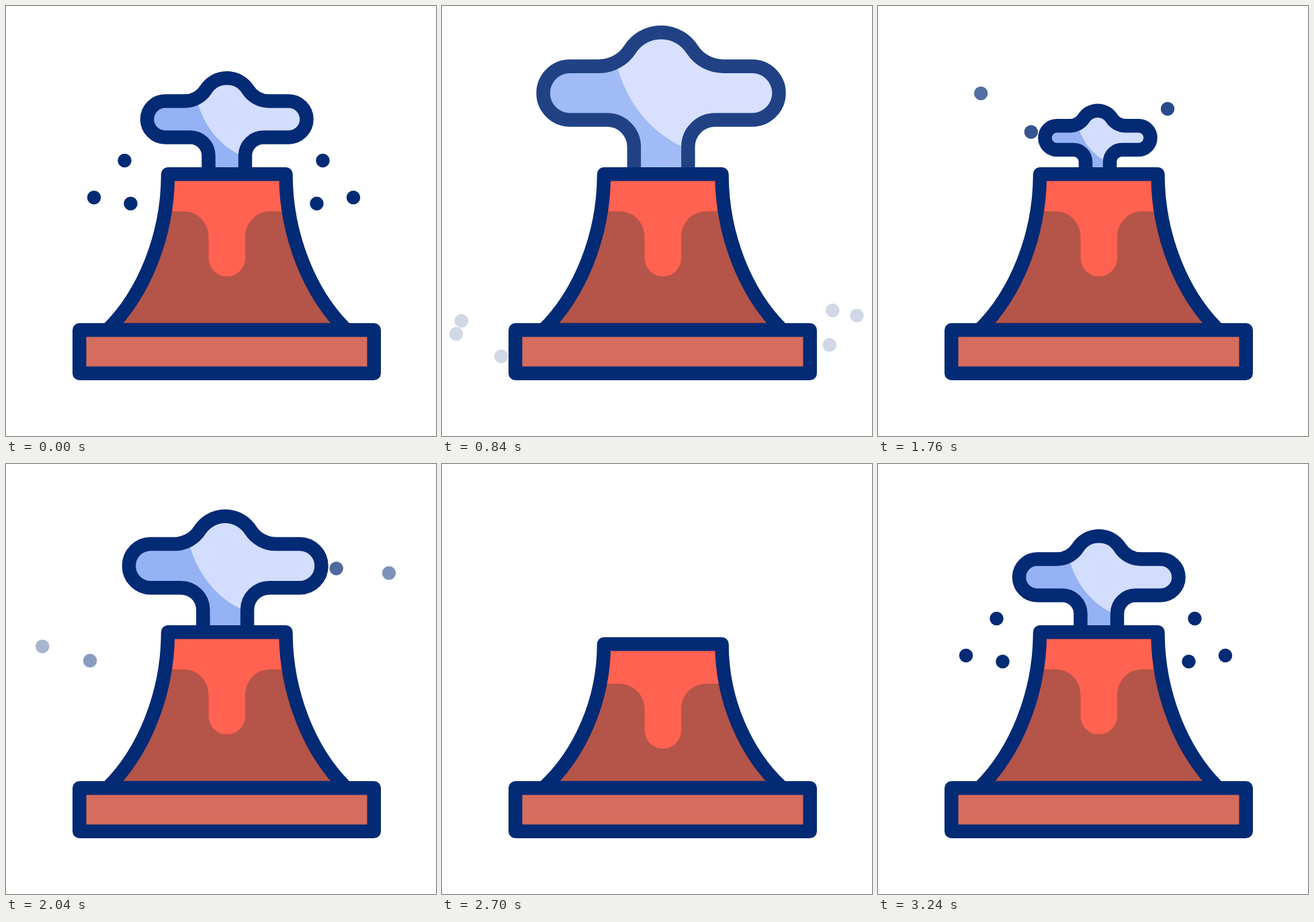
These frames come from a looping animation (640 px wide and 640 px high, 3.62 s). An HTML page:

```html
<!DOCTYPE html>
<html lang="en">
<head>
<meta charset="utf-8">
<title>Volcano</title>
<style>
  html, body { margin: 0; width: 100%; height: 100%; overflow: hidden; background: #fff; }
  svg { display: block; width: 100%; height: 100%; }
  .line { fill: none; stroke: #032a75; stroke-width: 20.5; stroke-linejoin: round; }
</style>
</head>
<body>
<svg viewBox="0 0 640 640">
  <defs>
    <path id="puff" d="M301.5 250V222.7a27.2 27.2 0 0 0-27.2-27.2H237a27 27 0 0 1 0-54H266
      A37.2 37.2 0 0 0 297.4 124.5A37.2 37.2 0 0 1 360.1 124.5A37.2 37.2 0 0 0 391.5 141.5
      H420.5a27 27 0 0 1 0 54H383.2a27.2 27.2 0 0 0-27.2 27.2V250"/>
    <clipPath id="puffClip"><use href="#puff"/></clipPath>
    <clipPath id="coneClip"><path class="cone"/></clipPath>
  </defs>
  <g id="dots" fill="#032a75"></g>
  <g id="cloud">
    <use href="#puff" fill="#d3ddfe"/>
    <path clip-path="url(#puffClip)" fill="#94b2f4" d="M281 125C288 170 313 204 347 221L362 228V260H190V125Z"/>
    <use id="cloudLine" class="line" href="#puff"/>
  </g>
  <g clip-path="url(#coneClip)">
    <rect x="130" y="230" width="400" height="260" fill="#ff6250"/>
    <path id="rock" fill="#b55448" d="M130 305.5H264a37.5 37.5 0 0 1 37.5 37.5V375.2a27.25 27.25 0 0 0 54.5 0
      V343a37.5 37.5 0 0 1 37.5-37.5H530V500H130Z"/>
  </g>
  <path class="cone line"/>
  <rect x="109.25" y="482.25" width="438.5" height="64.5" fill="#d66c5d"/>
  <rect class="line" x="109.25" y="482.25" width="438.5" height="64.5"/>
</svg>
<script>
const LOOP = 3620, STEP = 20, CRATER = { x: 328, y: 250 };
const $ = id => document.getElementById(id);
const clamp = v => Math.max(0, Math.min(1, v));
const progress = (t, from, to) => clamp((t - from) / (to - from));
const mix = (a, b, u) => a + (b - a) * u;

// Resting place and landing place of each ash dot
const ash = [
  [176.5, 230, 27.5, 496], [131, 285, 20, 512], [185.5, 294, 87, 548],
  [471.5, 230, 582.5, 479], [517, 285, 618.5, 482], [462.5, 294, 578, 529]
];
// Second burst: start time, landing x, easing power, cubic height coefficients
const burst = [
  [1493, 27, 2.25, -946, 2062, -870],
  [1593, 87, 2.4, -638, 1800, -862],
  [1635, 618, 2.7, -905, 1825, -688],
  [1793, 615, 2.4, -905, 2332, -1198]
];
const BURST_LIFE = 833;

const dots = ash.map(() => {
  const dot = document.createElementNS("http://www.w3.org/2000/svg", "circle");
  dot.setAttribute("r", 10.25);
  return $("dots").appendChild(dot);
});

function place(dot, x, y, opacity) {
  dot.setAttribute("cx", x);
  dot.setAttribute("cy", y);
  dot.setAttribute("opacity", opacity);
}

function drawDots(t) {
  dots.forEach((dot, i) => {
    const [restX, restY, endX, endY] = ash[i];
    if (t < 985) {
      const u = progress(t, 220, 870);
      place(dot, mix(endX, restX, (1 - u) ** 1.5),
        mix(restY, endY, u * u) - 80 * u * (1 - u), 1 - progress(t, 220, 985));
    } else if (t < 2700) {
      if (!burst[i]) return place(dot, 0, 0, 0);
      const [start, x, power, a, b, c] = burst[i];
      const u = progress(t, start, start + BURST_LIFE);
      place(dot, mix(x, CRATER.x, (1 - u) ** power),
        CRATER.y + u * (a + u * (b + u * c)), t < start ? 0 : 1 - u);
    } else {
      const u = progress(t, 2890, 3240);
      place(dot, mix(restX, CRATER.x, (1 - u) ** 1.4),
        mix(CRATER.y, restY, u) - 200 * u * (1 - u), u > 0 ? 1 : 0);
    }
  });
}

function cloudState(t) {
  if (t < 1200) {
    const s = 1 + 0.00077 * Math.max(0, t - 220);
    return { s, x: 328.75 - 5.6 * (s - 1), opacity: 1 - progress(t, 820, 990) };
  }
  if (t < 2600) {
    const s = progress(t, 1506, 1890) + 0.589 * progress(t, 1890, 2317);
    return { s, x: 328 - 1.5 * s, opacity: 1 - progress(t, 2134, 2317) };
  }
  const s = progress(t, 2860, 3240);
  return { s, x: 328 + 0.75 * s, opacity: 1 };
}

function drawCloud(t) {
  const { s, x, opacity } = cloudState(t);
  const visible = s > 0.02 && opacity > 0;
  $("cloud").style.display = visible ? "" : "none";
  if (!visible) return;
  $("cloud").setAttribute("opacity", opacity);
  $("cloud").setAttribute("transform", `translate(${x} 250) scale(${s}) translate(-328.75 -250)`);
  $("cloudLine").style.strokeWidth = 20.5 / s;
}

function drawCone(t) {
  const dip = (from, low, to) => progress(t, from, low) - progress(t, low, to);
  const sink = 26.5 * (dip(985, 1270, 1570) + dip(2320, 2600, 2900));
  const y = v => 482 - (482 - v) * (1 - sink / 231.75);
  const d = `M151 482C205 ${y(429)} 241 ${y(342)} 241 ${y(250.25)}H416.5
    C416.5 ${y(342)} 452.5 ${y(429)} 506.5 482Z`;
  document.querySelectorAll(".cone").forEach(path => path.setAttribute("d", d));
  $("rock").setAttribute("transform", `translate(0 ${sink * 1.21})`);
}

function draw(t) {
  drawDots(t);
  drawCloud(t);
  drawCone(t);
}

const begin = performance.now();
function tick() {
  const t = (performance.now() - begin) % LOOP;
  draw(Math.floor(t / STEP) * STEP);
  requestAnimationFrame(tick);
}
tick();
</script>
</body>
</html>
```
